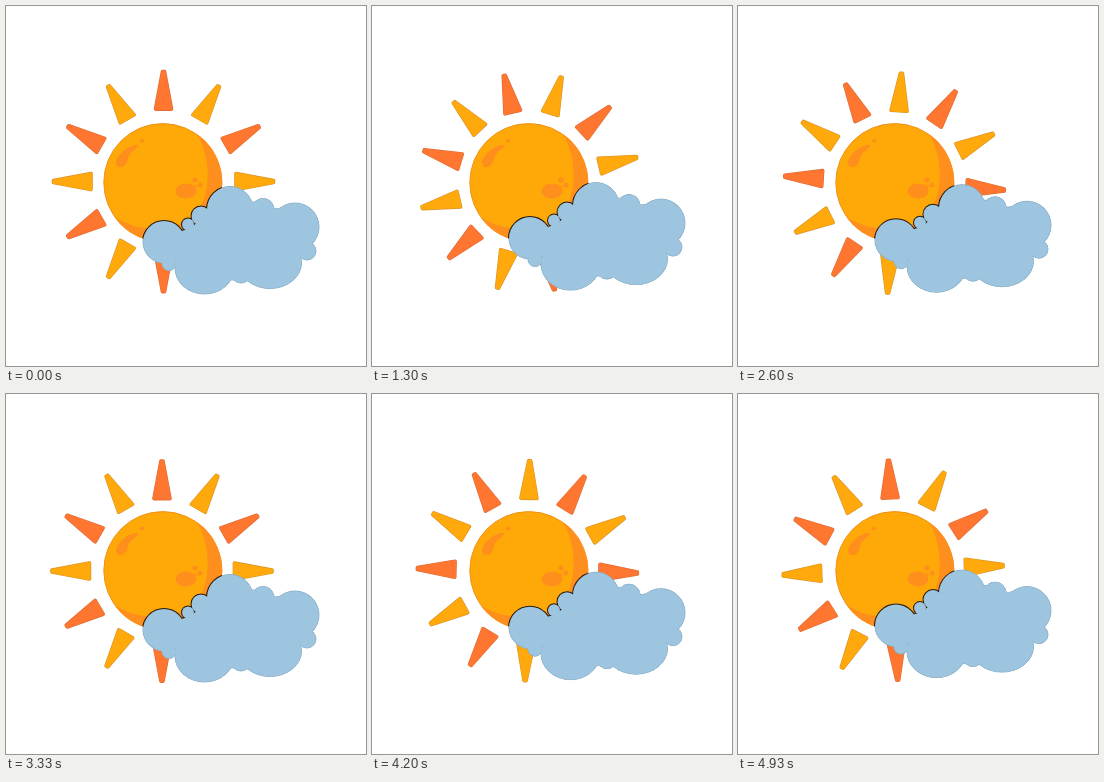
Animation of 360x360 px, one loop 5 s. Source, as an HTML page:

```html
<!DOCTYPE html>
<html lang="en">
<head>
<meta charset="utf-8">
<title>Sun and cloud</title>
<style>
  html, body { margin: 0; width: 100%; height: 100%; overflow: hidden; background: #fff; }
  svg { display: block; width: 100vw; height: 100vh; }
  .spot { fill: #ff8f1c; }
  .rim { stroke: #8db3cc; stroke-width: 1; }
  .edge { stroke: #2b1a08; stroke-width: 2; }
</style>
</head>
<body>
<svg viewBox="0 0 360 360">
  <defs>
    <path id="ray" d="M-1-110H1L8-72.500H-8Z" stroke-linejoin="round"/>
    <clipPath id="disc"><circle cx="156.800" cy="176.600" r="59.500"/></clipPath>
    <g id="puffs">
      <circle cx="158" cy="236" r="21"/>
      <circle cx="163" cy="257.500" r="7"/>
      <ellipse cx="198.500" cy="262" rx="29.500" ry="26"/>
      <circle cx="235" cy="267" r="10"/>
      <ellipse cx="264" cy="257" rx="31.500" ry="25.500"/>
      <circle cx="301" cy="245" r="9"/>
      <circle cx="289" cy="221" r="24"/>
      <circle cx="257" cy="203.500" r="11"/>
      <circle cx="224" cy="203.500" r="23"/>
      <circle cx="195" cy="210" r="9.500"/>
      <circle cx="182" cy="218.500" r="6"/>
      <path d="M160 230L185 222L200 208L240 196H252L270 203L285 200L300 240L272 268L246 273L226 274L205 270L160 250Z"/>
    </g>
  </defs>

  <g id="rays"></g>

  <circle cx="156.800" cy="176.600" r="59" fill="#ffa908" stroke="#f0921c"/>
  <g class="spot">
    <path clip-path="url(#disc)" d="M189 125C204 146 206 184 193 203C178 225 139 230 108 211L120 250H230V120Z"/>
    <path d="M132 139C125 138 113 146 110 155C109 161 115 163 119 159C123 155 121 150 126 146C129 143 133 141 132 139Z"/>
    <ellipse cx="136.200" cy="134.800" rx="2.500" ry="1.800"/>
    <ellipse cx="180" cy="185" rx="10.500" ry="7.500"/>
    <circle cx="189" cy="174" r="2.600"/>
    <circle cx="194" cy="179" r="2.500"/>
    <circle cx="189.500" cy="180.500" r="1.300"/>
  </g>

  <use class="cloud rim" href="#puffs"/>
  <g clip-path="url(#disc)"><use class="cloud edge" href="#puffs"/></g>
  <use class="cloud" href="#puffs" fill="#9dc5e0"/>
</svg>
<script>
  const LOOP = 5000, BOB = LOOP / 1.5;
  const rays = document.getElementById('rays');
  const clouds = document.querySelectorAll('.cloud');

  function addRay(angle, color, width) {
    const ray = document.createElementNS('http://www.w3.org/2000/svg', 'use');
    const attrs = { href: '#ray', transform: `rotate(${angle})`, fill: color, stroke: color, 'stroke-width': width };
    for (const name in attrs) ray.setAttribute(name, attrs[name]);
    rays.append(ray);
  }

  // Each ray is a darker rim with the bright shape on top.
  for (let i = 0; i < 12; i++) {
    addRay(i * 30, i % 2 ? '#d8922a' : '#dc6c3a', 3.6);
    addRay(i * 30, i % 2 ? '#ffa90c' : '#ff7631', 2.4);
  }

  // Poses hold for 30 ms and 70 ms in turn.
  const hold = t => Math.floor(t / 100) * 100 + (t % 100 < 30 ? 0 : 100 / 3);

  function draw() {
    const t = hold(performance.now() % LOOP);
    const lift = 2.2 * (Math.cos(2 * Math.PI * t / BOB) - 1);
    // The ring sits slightly off its pivot, so it wobbles as it turns.
    rays.setAttribute('transform', `translate(156.3 175.9) rotate(${180 * t / LOOP}) translate(1.2 -.3)`);
    for (const c of clouds) c.setAttribute('transform', `translate(0 ${lift})`);
    requestAnimationFrame(draw);
  }
  draw();
</script>
</body>
</html>
```
